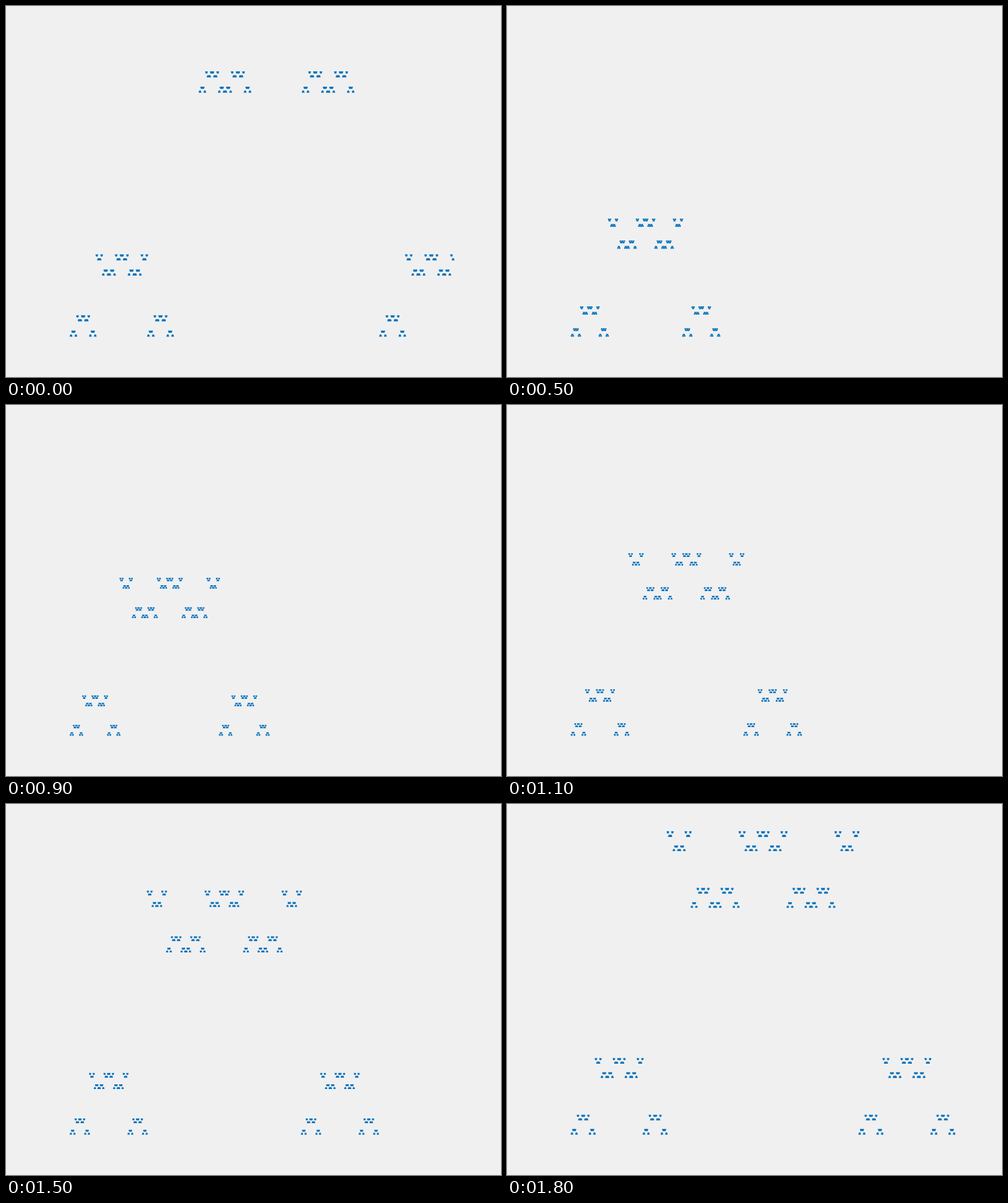
These frames come from a looping animation (840 px wide and 630 px high, 1900 ms). An HTML page with a canvas:

```html
<!DOCTYPE html>
<html>
<head>
<meta charset="utf-8">
<style>
  html, body { margin: 0; width: 100%; height: 100%; overflow: hidden; background: #f0f0f0; }
  canvas { display: block; }
</style>
</head>
<body>
<canvas id="stage" width="840" height="630"></canvas>
<script>
const ctx = document.getElementById('stage').getContext('2d');
const LEFT = 109, RIGHT = 760.2, TOP = 47, BOTTOM = 560.6;
const ASPECT = 513.45 / 651;
const DOT = 0.8, MIN_SIZE = 0.5;
const STEPS = 19, STEP_MS = 100;

// Four quarter-size copies: two on the base line, two flipped along the far side.
function dust(x, y, size, dir) {
  const far = y + dir * size * ASPECT;
  if (x > RIGHT || Math.max(y, far) < TOP) return;
  if (size < MIN_SIZE) {
    ctx.rect(x - DOT, Math.min(y, far) - DOT, size + 2 * DOT, size * ASPECT + 2 * DOT);
    return;
  }
  const q = size / 4;
  dust(x, y, q, dir);
  dust(x + q, far, q, -dir);
  dust(x + 2 * q, far, q, -dir);
  dust(x + 3 * q, y, q, dir);
}

let shown = -1;
function draw(now) {
  const step = Math.floor(now / STEP_MS) % STEPS;
  if (step !== shown) {
    shown = step;
    ctx.fillStyle = '#f0f0f0';
    ctx.fillRect(0, 0, 840, 630);
    ctx.fillStyle = '#0072bd';
    ctx.beginPath();
    dust(LEFT, BOTTOM, 651 * 4 ** ((step + 1) / STEPS), -1);
    ctx.fill();
  }
  requestAnimationFrame(() => draw(performance.now() - start));
}
const start = performance.now();
draw(0);
</script>
</body>
</html>
```
